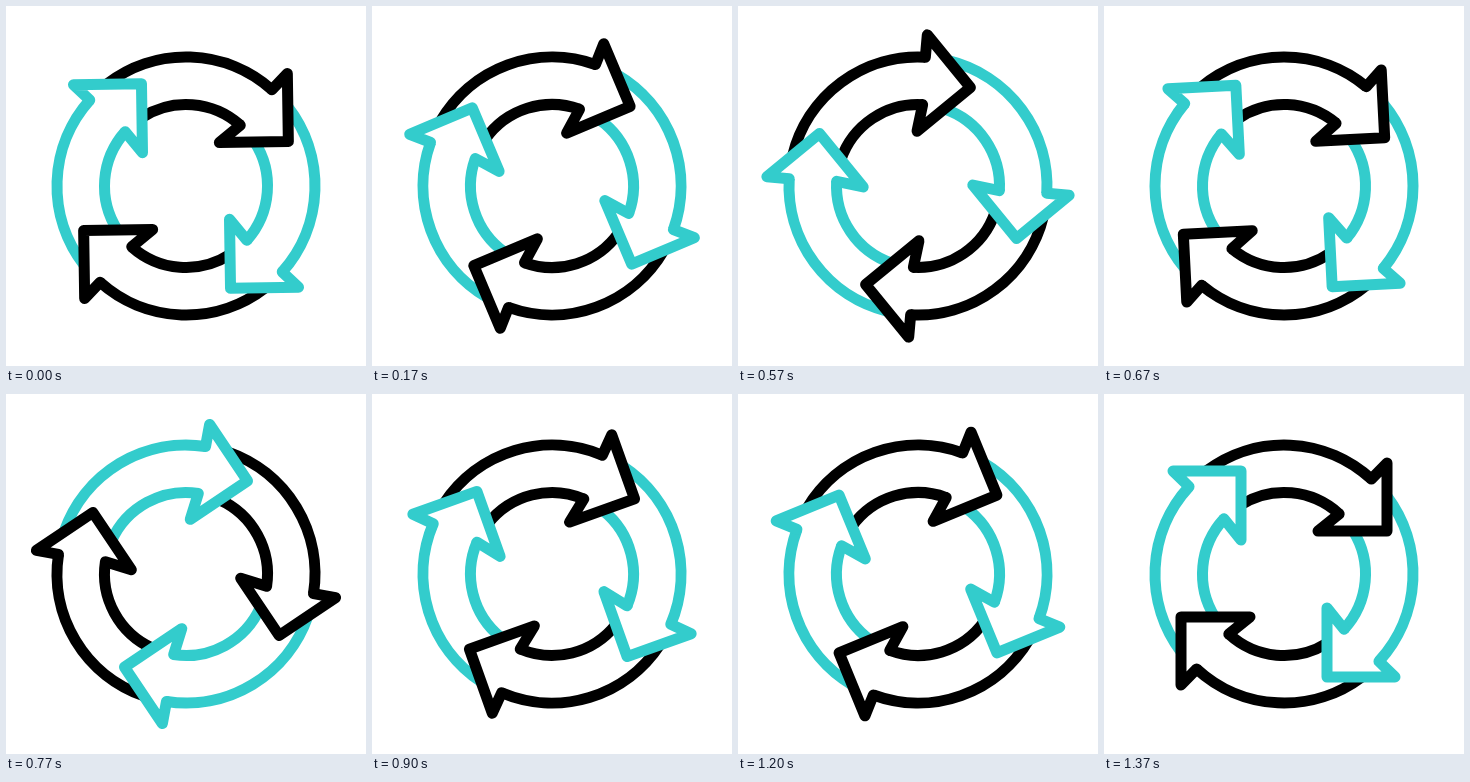
Animation of 360x360 px, one loop 1670 ms. Source, as an HTML page:

```html
<!DOCTYPE html>
<html lang="en">
<head>
<meta charset="utf-8">
<title>Cycle arrows</title>
<style>
  html, body { margin: 0; width: 100%; height: 100%; overflow: hidden; background: #fff; }
  svg { display: block; width: 100vw; height: 100vh; }
  path { fill: none; stroke-width: 11; stroke-linejoin: round; }
  .head { stroke-linecap: round; }
</style>
</head>
<body>
<svg viewBox="0 0 360 360">
  <g transform="translate(180 180)">
    <g id="wheel"></g>
  </g>
</svg>
<script>
const LOOP = 1670, FPS = 30, LAST = 42;
const WINDUP = 13.75, BACK = -56.5;
const OUTER = 129, INNER = 81.5, NOTCH = -47.4;
const COLORS = ['#000', '#33cccc'];
const wheel = document.getElementById('wheel');

function polar(r, deg) {
  const a = deg * Math.PI / 180;
  return (r * Math.cos(a)).toFixed(2) + ' ' + (r * Math.sin(a)).toFixed(2);
}

function arc(r, from, to) {
  return `M${polar(r, from)}A${r} ${r} 0 0 1 ${polar(r, to)}`;
}

function addPath(d, turn, name) {
  const p = document.createElementNS('http://www.w3.org/2000/svg', 'path');
  p.setAttribute('d', d);
  p.setAttribute('class', name);
  p.setAttribute('stroke', COLORS[turn % 2]);
  p.setAttribute('transform', `rotate(${turn * 90})`);
  wheel.appendChild(p);
}

const body = arc(OUTER, -127, NOTCH) + arc(INNER, -122, NOTCH);
const head = `M${polar(OUTER, NOTCH)}L103 -111V-43H34L${polar(INNER, NOTCH)}`;

// Heads lie above every body so that they hide the tail ends.
for (let i = 0; i < 4; i++) addPath(body, i, 'body');
for (let i = 0; i < 4; i++) addPath(head, i, 'head');

// Bezier easing with flat ends; x1 and x2 are the handle lengths.
function ease(u, x1, x2) {
  let lo = 0, hi = 1;
  for (let i = 0; i < 30; i++) {
    const s = (lo + hi) / 2, q = 1 - s;
    if (3 * q * q * s * x1 + 3 * q * s * s * x2 + s * s * s < u) lo = s;
    else hi = s;
  }
  return lo * lo * (3 - 2 * lo);
}

// Wind up backwards, then one full turn forwards.
function angle(step) {
  if (step >= LAST) return 360;
  if (step < WINDUP) return BACK * ease(step / WINDUP, 1 / 3, 2 / 3);
  const u = (step - WINDUP) / (LAST - WINDUP);
  return BACK + (360 - BACK) * ease(u, 0.452, 0.53);
}

function draw(ms) {
  const step = 1 + Math.floor((ms % LOOP + 4) * FPS / 1000);
  wheel.setAttribute('transform', `rotate(${angle(step).toFixed(3)})`);
}

const start = performance.now();
function tick(now) {
  draw(Math.max(0, now - start));
  requestAnimationFrame(tick);
}
draw(0);
requestAnimationFrame(tick);
</script>
</body>
</html>
```
